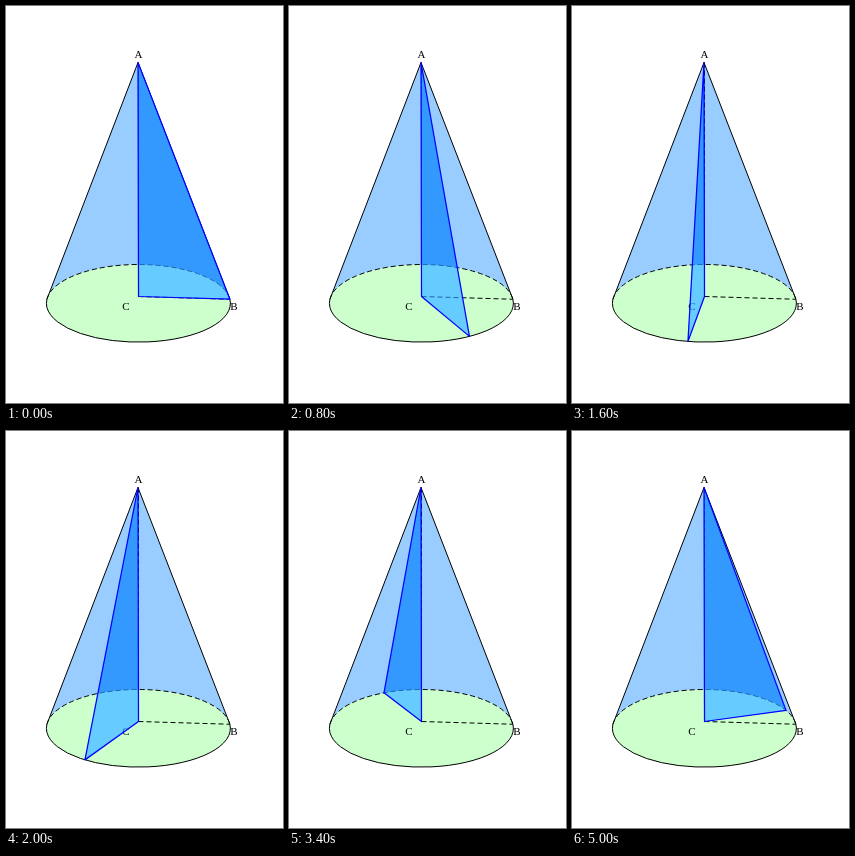
These frames come from a looping animation (277 by 397 pixels, 5.2 s). An HTML page with a canvas:

```html
<!DOCTYPE html>
<html>
<head>
<meta charset="utf-8">
<style>
  html, body { margin: 0; width: 100%; height: 100%; overflow: hidden; background: #fff; }
  canvas { display: block; }
</style>
</head>
<body>
<canvas id="stage" width="277" height="397"></canvas>
<script>
const ctx = document.getElementById('stage').getContext('2d');
const STEP = 200, STEPS = 26;
const RX = 92, RY = 38.8;
const rad = degrees => degrees * Math.PI / 180;
const rim = degrees => [132.4 + RX * Math.cos(rad(degrees)), 297.3 + RY * Math.sin(rad(degrees))];
const A = [132, 56.5], C = [132.5, 290.5];
const RIGHT = -6, LEFT = 186;
const B = rim(RIGHT);

// Rim angle of the moving corner at a few steps; arc length is even in between.
const keys = [[0, -6], [4, 58.5], [6, 80.6], [8, 100.3], [12, 159], [13, 180],
  [17, 246], [18, 257.8], [21, 285.4], [24, 319.1], [25, 332.5], [26, 354]];

function angleAt(step) {
  const i = keys.findIndex(key => key[0] > step) - 1;
  const [s0, from] = keys[i], [s1, to] = keys[i + 1];
  const slices = 100, d = (to - from) / slices, arc = [0];
  for (let k = 0; k < slices; k++) {
    const p = rad(from + (k + 0.5) * d);
    arc.push(arc[k] + Math.hypot(RX * Math.sin(p), RY * Math.cos(p)));
  }
  const goal = arc[slices] * (step - s0) / (s1 - s0);
  return from + d * arc.findIndex(length => length >= goal);
}

function polygon(...points) {
  ctx.beginPath();
  points.forEach(p => ctx.lineTo(...p));
}

function rimPath(from, to) {
  ctx.beginPath();
  ctx.ellipse(132.4, 297.3, RX, RY, 0, rad(from), rad(to));
}

function fill(color) {
  ctx.fillStyle = color;
  ctx.fill();
}

function solids(side, base) {
  polygon(A, rim(RIGHT), rim(LEFT));
  fill(side);
  rimPath(0, 360);
  fill(base);
}

function hiddenLines(color) {
  ctx.strokeStyle = ctx.fillStyle = color;
  ctx.setLineDash([5, 3]);
  rimPath(LEFT, 360 + RIGHT);
  ctx.stroke();
  polygon([132.5, 56.5], C);
  ctx.stroke();
  polygon(C, B);
  ctx.stroke();
  ctx.setLineDash([]);
  ctx.fillText('C', 120, 304);
}

function draw(step) {
  ctx.fillStyle = '#fff';
  ctx.fillRect(0, 0, 277, 397);
  ctx.font = '11px "Liberation Serif", serif';
  ctx.textAlign = 'center';
  ctx.lineWidth = 1;
  ctx.lineJoin = 'round';

  solids('#99ccff', '#ccffcc');
  hiddenLines('#000');
  ctx.fillText('A', 132.5, 52);
  ctx.fillText('B', 228, 304);
  rimPath(RIGHT, LEFT);
  ctx.stroke();
  polygon(rim(LEFT), A, B);
  ctx.stroke();

  // The turning triangle tints whatever lies behind it.
  const P = rim(angleAt(step));
  ctx.save();
  polygon(A, C, P);
  ctx.clip();
  solids('#3399ff', '#66ccff');
  hiddenLines('#1f66a8');
  ctx.restore();
  polygon(A, C, P);
  ctx.closePath();
  ctx.strokeStyle = '#00f';
  ctx.lineWidth = 1.25;
  ctx.stroke();
}

function tick() {
  draw(Math.floor(performance.now() / STEP) % STEPS);
  requestAnimationFrame(tick);
}
tick();
</script>
</body>
</html>
```
